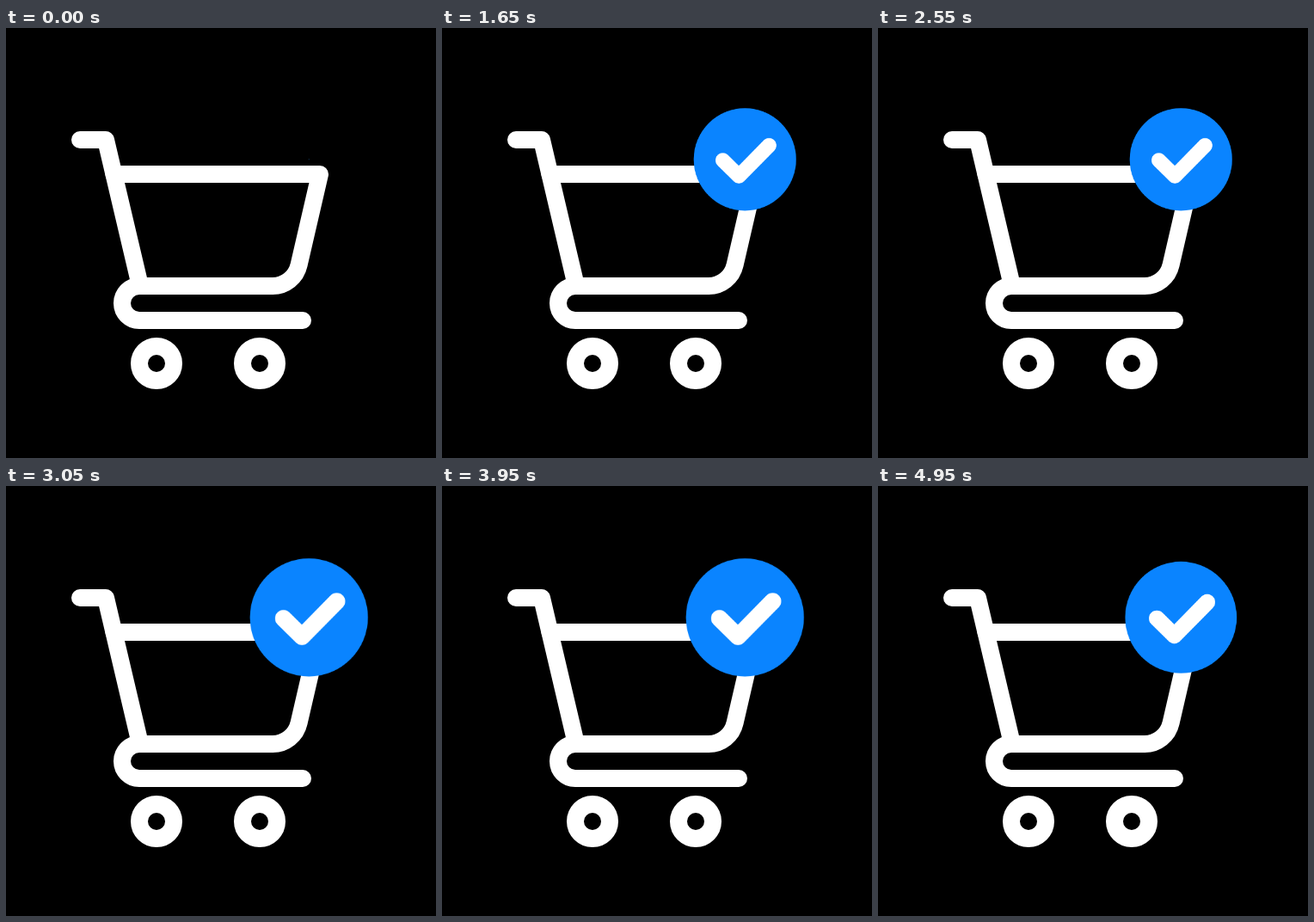
Write an HTML page that moves like this. It is 500 by 500 pixels and loops after 5000 ms.

```html
<!DOCTYPE html>
<html lang="en">
<head>
<meta charset="utf-8">
<title>Added to cart</title>
<style>
  html, body {
    margin: 0;
    width: 100%;
    height: 100%;
    overflow: hidden;
    background: #000;
  }
  svg {
    display: block;
    width: 100%;
    height: 100%;
  }
  .line {
    fill: none;
    stroke: #fff;
    stroke-linecap: round;
    stroke-linejoin: round;
  }
  .badge {
    --settle: cubic-bezier(.3333, .6667, .6667, 1);
    transform-origin: 0 0;
    animation: badge 5s linear infinite;
  }
  /* One pop, then a pulse every 900 ms; the loop cuts the last pulse short. */
  @keyframes badge {
    0% { transform: scale(0); }
    5% { transform: scale(1.8); animation-timing-function: var(--settle); }
    15%, 33%, 51%, 69%, 87% { transform: scale(1.1); }
    21%, 39%, 57%, 75% { transform: scale(1.5); animation-timing-function: var(--settle); }
    93% { transform: scale(1.5); animation-timing-function: cubic-bezier(.3333, .471, .6667, .804); }
    100% { transform: scale(1.169); }
  }
</style>
</head>
<body>
<svg viewBox="0 0 500 500">
  <g class="line" stroke-width="20">
    <path d="M86 130H116L156 300"/>
    <path d="M125.4 170H365L340.6 275.5A31.5 31.5 0 0 1 310 300H155A20 20 0 0 0 155 340H345"/>
    <circle cx="175" cy="390" r="20"/>
    <circle cx="295" cy="390" r="20"/>
  </g>
  <g transform="translate(352.2 152.8)">
    <g class="badge">
      <circle r="54.1" fill="#0a84ff"/>
      <path class="line" stroke-width="15.5" d="M-23.3 .9L-6.4 17.6L25.5 -14.8"/>
    </g>
  </g>
</svg>
</body>
</html>
```
